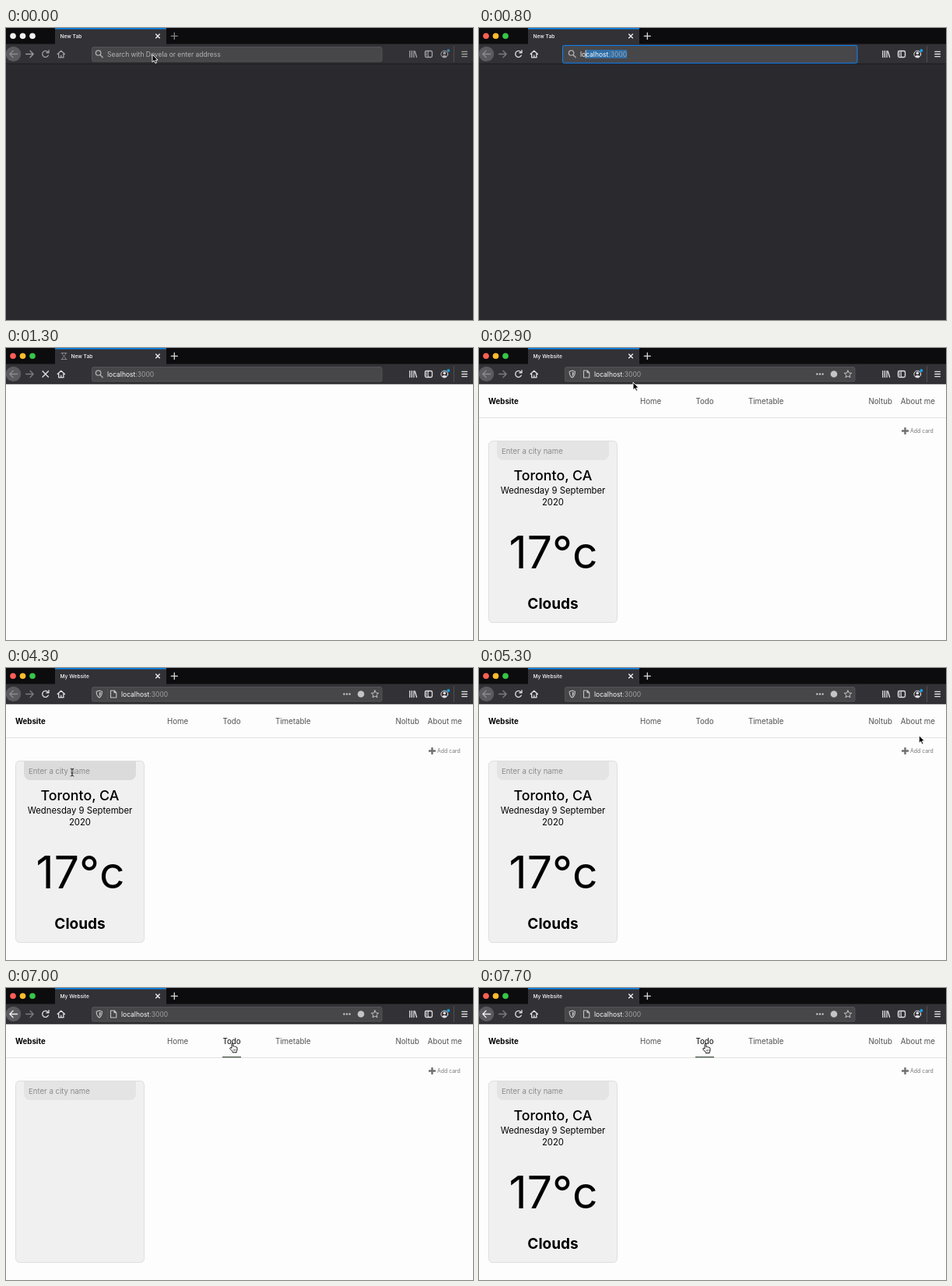
Recreate the animation shown at these times as an HTML page. Size 600 px wide and 375 px high, loop 8 s.

```html
<!DOCTYPE html>
<html lang="en">
<head>
<meta charset="utf-8">
<title>Weather card</title>
<style>
html, body { margin: 0; width: 100%; height: 100%; overflow: hidden; background: #2a292d; }
svg { display: block; width: 100%; height: 100%; font-family: Inter, "Open Sans", sans-serif; }
text { white-space: pre; }
.line { fill: none; stroke: currentColor; stroke-width: 1.3; stroke-linecap: round; stroke-linejoin: round; }
.url { font-size: 8.5px; }
.nav { font-size: 9.7px; fill: #505050; }
.mid { text-anchor: middle; }
</style>
</head>
<body>
<svg viewBox="0 0 600 375" preserveAspectRatio="none">
  <rect width="600" height="375" fill="#2a292d"/>
  <rect id="white" y="46" width="600" height="329" fill="#fefdfe"/>

  <g id="site">
    <path d="M0 89.5H600" stroke="#e1e1e1"/>
    <text x="12" y="71.5" font-size="9.7" font-weight="700">Website</text>
    <g class="nav">
      <text x="207" y="71.5">Home</text>
      <text id="todo" x="290" y="71.5" class="mid">Todo</text>
      <text x="346" y="71.5">Timetable</text>
      <text x="500.5" y="71.5">Noltub</text>
      <text x="586" y="71.5" text-anchor="end">About me</text>
    </g>
    <path id="underline" d="M278 88.7H302" stroke-width="1.4"/>
    <path d="M543 106.5h9M547.5 102v9" stroke="#707070" stroke-width="2.4"/>
    <text x="554" y="109.3" font-size="6.9" fill="#777">Add card</text>
    <g id="card">
      <rect x="12.5" y="119.5" width="165" height="233" rx="5" fill="#f1f0f1" stroke="#dedede"/>
      <path id="input" d="M23 120H167V136a8 8 0 0 1-8 8H31a8 8 0 0 1-8-8Z"/>
      <text x="29" y="135.7" font-size="9.6" fill="#8a8a8a">Enter a city name</text>
    </g>
    <g id="weather" class="mid">
      <text x="95" y="170" font-size="17.8" font-weight="500">Toronto, CA</text>
      <text x="95" y="187" font-size="11.3">Wednesday 9 September</text>
      <text x="95" y="202" font-size="11.3">2020</text>
      <text x="95.5" y="283" font-size="57">17°c</text>
      <text x="95" y="334.5" font-size="19" font-weight="700">Clouds</text>
    </g>
  </g>

  <rect width="600" height="21" fill="#0c0b0d"/>
  <rect y="20.5" width="600" height="25.5" fill="#323135"/>
  <path d="M0 46H600" stroke="#1a191c" stroke-width=".9"/>
  <rect x="63" width="143" height="21" fill="#323135"/>
  <rect x="63" width="143" height="1.6" fill="#0a84e8"/>
  <g id="lights">
    <circle cx="9" cy="10.2" r="3.8"/><circle cx="21.5" cy="10.2" r="3.8"/><circle cx="34" cy="10.2" r="3.8"/>
  </g>
  <path id="hourglass" class="line" color="#8f8f92" style="stroke-width:.9" d="M71 6.5h7M71 14.5h7M72 6.5c0 3 5 5 5 8M77 6.5c0 3-5 5-5 8"/>
  <text id="title" y="12.9" font-size="6.65" font-weight="500" fill="#f9f9fa"></text>
  <path class="line" color="#f4f4f5" d="M192.6 8l4.8 4.8M197.4 8l-4.8 4.8"/>
  <path id="plus" class="line" d="M212.2 10.3h8.2M216.3 6.2v8.2"/>

  <circle cx="9.5" cy="33.4" r="9.7" fill="#5b5a5e"/>
  <path id="back" class="line" d="M4.8 33.5h9.8M9 29.2l-4.2 4.3 4.2 4.3"/>
  <path id="forward" class="line" d="M25.6 33.5h9.6M31 29.2l4.2 4.3-4.2 4.3"/>
  <g id="tools">
    <path id="reload" class="line" d="M54.3 35.2a4 4 0 1 1-.5-4.4M55 28.6v3.2h-3.2"/>
    <path id="stop" class="line" d="M47 29.8l7.4 7.4M54.4 29.8l-7.4 7.4"/>
    <path class="line" d="M66.2 33.5l4.6-4.3 4.6 4.3M67.7 33v4.9h6.2V33M70.8 37.5v-2.3"/>
    <path class="line" d="M518.8 29.5v8M521.4 29.5v8M524 29.5v8M525.4 30l2.2 7.5"/>
    <rect class="line" x="538.5" y="29.5" width="9" height="8" rx="1.5"/>
    <path class="line" style="stroke-width:1" d="M542.3 30v7M540 31.8h.8M540 33.5h.8M540 35.2h.8"/>
    <circle class="line" style="stroke-width:1" cx="563.3" cy="33.6" r="4.4"/>
    <path fill="currentColor" d="M560.2 36.8a3.2 2.4 0 0 1 6.2 0a4.3 4.3 0 0 1-6.2 0M561.5 32.3a1.8 1.8 0 1 1 3.6 0a1.8 1.8 0 1 1-3.6 0"/>
    <path class="line" d="M585.8 30.4h6.6M585.8 33.5h6.6M585.8 36.6h6.6"/>
  </g>
  <circle id="badge" cx="568.3" cy="29" r="2"/>
  <path d="M575.5 23V44" stroke="#59585b" stroke-width=".8"/>

  <rect id="field" fill="#474649"/>
  <g id="search" color="#b0b0b3">
    <circle class="line" cx="118.6" cy="32" r="3.2"/><path class="line" d="M121 34.5l3.2 3.2"/>
  </g>
  <g id="siteIcons" color="#c4c4c6">
    <path class="line" style="stroke-width:1.1" d="M119.8 29l3.6 1.3c0 4-1 6.3-3.6 7.7c-2.6-1.4-3.6-3.7-3.6-7.7Z"/>
    <path fill="currentColor" d="M119.8 30.7l2 .7c0 2.3-.6 3.8-2 4.9Z"/>
    <path d="M130.5 26V41" stroke="#58575a" stroke-width=".7"/>
    <path class="line" style="stroke-width:1.1" d="M134.5 29h4.7l2.6 2.6v6.4h-7.3ZM139 29v2.8h2.7"/>
    <g fill="currentColor"><circle cx="434.4" cy="33.5" r="1.2"/><circle cx="438" cy="33.5" r="1.2"/><circle cx="441.6" cy="33.5" r="1.2"/></g>
    <circle cx="456" cy="33.5" r="4.3" fill="currentColor"/>
    <path id="star" class="line" style="stroke-width:1"/>
  </g>
  <rect id="selection" y="28" height="11" fill="#2f6ea8"/>
  <path id="caret" stroke="#f9f9fa" stroke-width=".8"/>
  <text id="hint" class="url" x="130" y="36.7" fill="#b4b4b7">Search with Dovela or enter address</text>
  <text id="address" class="url" y="36.7" fill="#f9f9fa"><tspan id="host"></tspan><tspan id="port" fill="#a3a3a6"></tspan></text>

  <g id="arrow"><path d="M0 0V9.8L2.3 7.7L3.9 11.3L5.6 10.5L4.1 7.1H7.1Z" fill="#000" stroke="#fff" stroke-width=".9"/></g>
  <g id="ibeam" fill="none" stroke-linecap="round">
    <path d="M-2-5Q0-5 0-3.5Q0-5 2-5M0-3.5V3.5M-2 5Q0 5 0 3.5Q0 5 2 5M-1 1H1" stroke="#fff" stroke-width="2" opacity=".7"/>
    <path d="M-2-5Q0-5 0-3.5Q0-5 2-5M0-3.5V3.5M-2 5Q0 5 0 3.5Q0 5 2 5M-1 1H1" stroke="#111"/>
  </g>
  <g id="hand"><path d="M3 7V1.4Q3 .4 3.9 .4T4.8 1.4V4.6Q6.2 3.8 6.6 5Q8 4.3 8.4 5.5Q10 5.1 10 6.8V9Q10 10.3 9.2 11.2V12.5H4.2V11.5L1 8Q.2 7 1.1 6.4Q2 6 3 7Z" fill="#fff" stroke="#000" stroke-width=".9" stroke-linejoin="round"/><path d="M5 8v2.6M6.6 8v2.6M8.2 8v2.6" stroke="#000" stroke-width=".5"/></g>
</svg>
<script>
const LOOP = 8000, STEP = 100;
const ui = Object.fromEntries([...document.querySelectorAll("[id]")].map(e => [e.id, e]));
const set = (id, attrs) => { for (const k in attrs) ui[id].setAttribute(k, attrs[k]); };
const show = (id, on) => { ui[id].style.display = on ? "" : "none"; };
const write = (id, text) => { if (ui[id].textContent !== text) ui[id].textContent = text; };
const tint = (id, color) => { ui[id].style.color = color; };

// pointer stops: time, x, y
const path = [
  [0, 188, 34], [700, 188, 36], [2800, 198, 44], [2900, 198, 44],
  [3100, 152, 88], [3300, 62, 142], [3400, 42, 144], [3600, 76, 136], [3700, 81, 134],
  [4000, 83, 134], [4200, 84, 134], [4300, 85, 134],
  [4600, 320, 124], [4900, 545, 108], [5100, 590, 98], [5200, 588, 92],
  [5500, 520, 76], [5800, 370, 72], [6000, 302, 70], [6200, 286, 67],
  [6700, 287, 70], [7700, 287, 71], [8000, 287, 71]
];

function pointer(t) {
  const i = Math.max(1, path.findIndex(p => p[0] >= t));
  const [t0, x0, y0] = path[i - 1], [t1, x1, y1] = path[i];
  const k = (t - t0) / (t1 - t0);
  return [x0 + (x1 - x0) * k, y0 + (y1 - y0) * k];
}

set("star", { d: "M" + Array.from({ length: 10 }, (_, i) => {
  const a = i * Math.PI / 5, r = i % 2 ? 2.3 : 5;
  return `${474 + r * Math.sin(a)} ${33.8 - r * Math.cos(a)}`;
}).join("L") + "Z" });

function drawChrome(t) {
  const active = t >= 100, loading = t >= 1200 && t < 2000, loaded = t >= 2000;
  const focused = t >= 200 && t < 1100, typed = t >= 700;
  ["#ff5f57", "#febc2e", "#34c748"].forEach((c, i) => {
    ui.lights.children[i].setAttribute("fill", active ? c : "#f2f1f2");
  });
  tint("plus", active ? "#dcdcde" : "#858588");
  tint("tools", active ? "#e2e2e4" : "#a2a2a5");
  tint("forward", active ? "#7c7b7f" : "#9a999c");
  tint("back", t >= 6300 ? "#ededee" : "#8c8b8f");
  set("badge", { fill: active ? "#12a5e8" : "#3b7fa4" });
  show("hourglass", t >= 1300 && loading);
  write("title", loaded ? "My Website" : "New Tab");
  set("title", { x: loading ? 83.5 : 69.5 });
  show("reload", !loading);
  show("stop", loading && t >= 1300);

  const grow = focused ? 3 : 0;
  set("field", {
    x: 110.5 - grow, y: 24.5 - grow * .7, width: 372.5 + grow * 2, height: 18.5 + grow * 1.4,
    rx: 2, stroke: focused ? "#0a84ff" : "#5b5a5d", "stroke-width": focused ? 1 : .8
  });
  show("search", !loaded);
  show("siteIcons", loaded);
  show("hint", !typed);
  show("address", typed);
  write("host", "localhost");
  write("port", ":3000");
  set("address", { x: loaded ? 148 : 130 });

  const count = Math.min(14, 1 + Math.floor((t - 700) / 100));
  const caretX = 130 + (typed ? ui.address.getSubStringLength(0, count) : 0);
  const end = 130 + ui.address.getComputedTextLength();
  show("caret", focused);
  set("caret", { d: `M${caretX} 28.5V38.5` });
  show("selection", focused && typed);
  set("selection", { x: caretX, width: Math.max(0, end - caretX) });
}

function drawPage(t, x, y) {
  show("white", t >= 1300);
  show("site", t >= 2000);
  show("card", t < 6300 || t >= 6700);
  show("weather", t >= 2400 && t < 6300 || t >= 7300);
  const overInput = t >= 2900 && x > 23 && x < 167 && y > 120 && y < 145;
  const overTodo = t >= 6100;
  set("input", { fill: overInput ? "#dcdbdc" : "#e5e4e5" });
  set("todo", {
    fill: overTodo ? "#000" : "#505050",
    "font-weight": overTodo && t < 6300 ? 700 : 400
  });
  show("underline", overTodo);
  set("underline", { stroke: t < 6300 ? "#b9b9b9" : "#4d5b4d" });
  return overInput;
}

function draw(t) {
  const [x, y] = pointer(t);
  const overInput = drawPage(t, x, y);
  drawChrome(t);
  const kind = t >= 700 && t < 2900 ? "" : t >= 6100 ? "hand"
    : overInput || t >= 200 && t < 700 ? "ibeam" : "arrow";
  for (const id of ["arrow", "ibeam", "hand"]) {
    show(id, id === kind);
    set(id, { transform: `translate(${x} ${y})` });
  }
}

const start = performance.now();
function tick() {
  const t = (performance.now() - start) % LOOP;
  draw(Math.floor(t / STEP) * STEP);
  requestAnimationFrame(tick);
}
tick();
</script>
</body>
</html>
```
